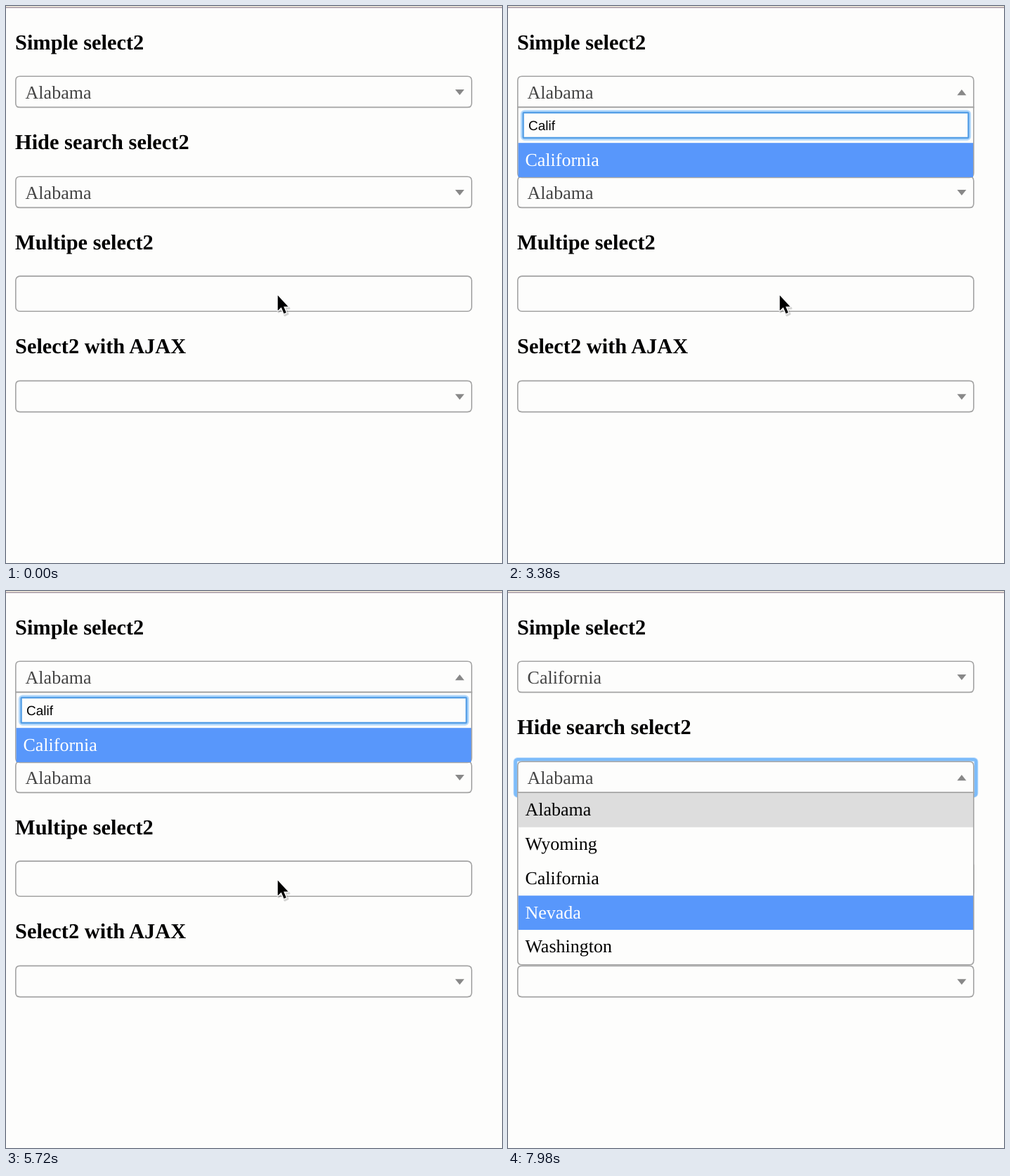
An HTML page that plays this animation: 706x794 px, repeating every 8 s.

```html
<!DOCTYPE html>
<html lang="en">
<head>
<meta charset="utf-8">
<title>Select2 demo</title>
<style>
  html, body { margin: 0; width: 100%; height: 100%; overflow: hidden; background: #fdfdfc; }
  svg { display: block; width: 100%; height: 100%; }
  text { font: 26px "Liberation Serif", "Times New Roman", serif; text-rendering: geometricPrecision; }
  .title { font-size: 30.42px; font-weight: bold; }
  .value { fill: #444; }
  .query { font: 19px "Liberation Sans", Arial, sans-serif; }
  .frame { fill: #fdfdfc; stroke: #a3a3a3; stroke-width: 1.6; }
  .arrow { fill: #888; }
  .ring { fill: none; stroke: #7dbcfa; stroke-width: 4.6; }
  .halo { fill: none; stroke: #cde5fd; stroke-width: 6.4; }
</style>
</head>
<body>
<svg viewBox="0 0 706 794">
  <rect width="706" height="794" fill="#fdfdfc"/>
  <rect width="706" height="1.4" fill="#f6f0dc"/>
  <rect y="1.4" width="706" height="1.6" fill="#aa9ca6"/>
  <text class="title" x="13" y="61.5">Simple select2</text>
  <text class="title" x="13" y="203.5">Hide search select2</text>
  <text class="title" x="13" y="346.5">Multipe select2</text>
  <text class="title" x="13" y="494.5">Select2 with AJAX</text>
  <rect class="frame" x="13.8" y="385.1" width="649" height="50.2" rx="6"/>
  <g id="ajax"></g>
  <g id="plain"></g>
  <g id="simple"></g>
  <g id="pointer" stroke-linejoin="round">
    <path d="M388 414v22l5-4 4 9 4-2-4-8h6z" fill="#000" opacity=".16" stroke="#000" stroke-width="3"/>
    <path d="M386.8 412.6v21.6l5-4.6 3.8 8.8 3.3-1.4-3.7-8.6h6.4z" stroke="#fff" stroke-width="2.6" paint-order="stroke"/>
  </g>
</svg>
<script>
const LOOP = 8000, ROW = 48.75, LEFT = 13.8, WIDTH = 649;
const STATES = ["Alabama", "Wyoming", "California", "Nevada", "Washington"];
const OPEN_SIMPLE = 840, CHOOSE = 7120, OPEN_PLAIN = 7680;
const KEY_TIMES = [960, 1000, 1100, 1140, 1220];
const DOWN_TIMES = [7820, 7860, 7960];
const BLINK = 1167;

const byId = id => document.getElementById(id);
const countPast = (times, t) => times.filter(time => t >= time).length;

function selectBox(y, value, open) {
  const bottom = y + 44.2, right = LEFT + WIDTH, r = open ? 0 : 6;
  const outline = `M${LEFT} ${y + 6}q0-6 6-6H${right - 6}q6 0 6 6V${bottom - r}q0 ${r} ${-r} ${r}H${LEFT + r}q${-r} 0 ${-r} ${-r}z`;
  const arrow = open ? `M639.3 ${y + 27}h13l-6.5-8.1z` : `M639.3 ${y + 18.8}h13l-6.5 8.1z`;
  return `<path class="frame" d="${outline}"/><path class="arrow" d="${arrow}"/>
    <text class="value" x="27.6" y="${y + 31.6}">${value}</text>`;
}

function panel(top, bottom) {
  return `<path class="frame" d="M${LEFT} ${top}H${LEFT + WIDTH}V${bottom - 6}q0 6-6 6H${LEFT + 6}q-6 0-6-6z"/>`;
}

function optionRows(top, names, active, selected) {
  return names.map((name, i) => {
    const y = top + i * ROW;
    const fill = i === active ? "#5897fb" : i === selected ? "#ddd" : "none";
    return `<rect x="14.6" y="${y}" width="647.4" height="${ROW}" fill="${fill}"/>
      <text x="24.4" y="${y + 32.3}" fill="${i === active ? "#fff" : "#000"}">${name}</text>`;
  }).join("");
}

function searchField(query) {
  return `<rect x="20.6" y="151" width="635.8" height="38" rx="3" fill="none" stroke="#b5dafc" stroke-width="5.4"/>
    <rect x="21.6" y="152" width="633.8" height="36" rx="1" fill="#fdfdfc" stroke="#559fe6" stroke-width="2.4"/>
    <text class="query" x="29" y="177">${query}</text>
    <rect id="caret" y="161" width="1.5" height="19.5"/>`;
}

function simpleSelect(open, chosen, query) {
  let svg = selectBox(100.2, chosen ? "California" : "Alabama", open);
  if (!open) return svg;
  const names = query ? ["California"] : STATES;
  return svg + panel(144.4, 195.6 + names.length * ROW) +
    searchField(query) + optionRows(195.2, names, 0);
}

function plainSelect(open, active) {
  const box = selectBox(243.2, "Alabama", open);
  if (!open) return box;
  const ring = ["halo", "ring"].map(name =>
    `<rect class="${name}" x="10.6" y="240.2" width="655.6" height="51.4" rx="3"/>`).join("");
  return ring + box + panel(287.4, 532.8) + optionRows(288, STATES, active, 0);
}

let drawn = "";
function render(t) {
  const simpleOpen = t >= OPEN_SIMPLE && t < CHOOSE;
  const chosen = t >= CHOOSE;
  const query = "Calif".slice(0, countPast(KEY_TIMES, t));
  const plainOpen = t >= OPEN_PLAIN;
  const active = countPast(DOWN_TIMES, t);

  const state = [simpleOpen, chosen, query, plainOpen, active].join();
  if (state !== drawn) {
    drawn = state;
    byId("simple").innerHTML = simpleSelect(simpleOpen, chosen, query);
    byId("plain").innerHTML = plainSelect(plainOpen, active);
    byId("pointer").style.display = chosen ? "none" : "";
    const caret = byId("caret");
    if (caret) caret.setAttribute("x", 29 + document.querySelector(".query").getComputedTextLength());
  }
  const caret = byId("caret");
  if (caret) {
    const lastKey = KEY_TIMES[query.length - 1] ?? OPEN_SIMPLE;
    caret.style.display = (t - lastKey) % BLINK < BLINK / 2 ? "" : "none";
  }
}

byId("ajax").innerHTML = selectBox(534.4, "", false);
const start = performance.now();
function tick() {
  render((performance.now() - start) % LOOP);
  requestAnimationFrame(tick);
}
tick();
</script>
</body>
</html>
```
